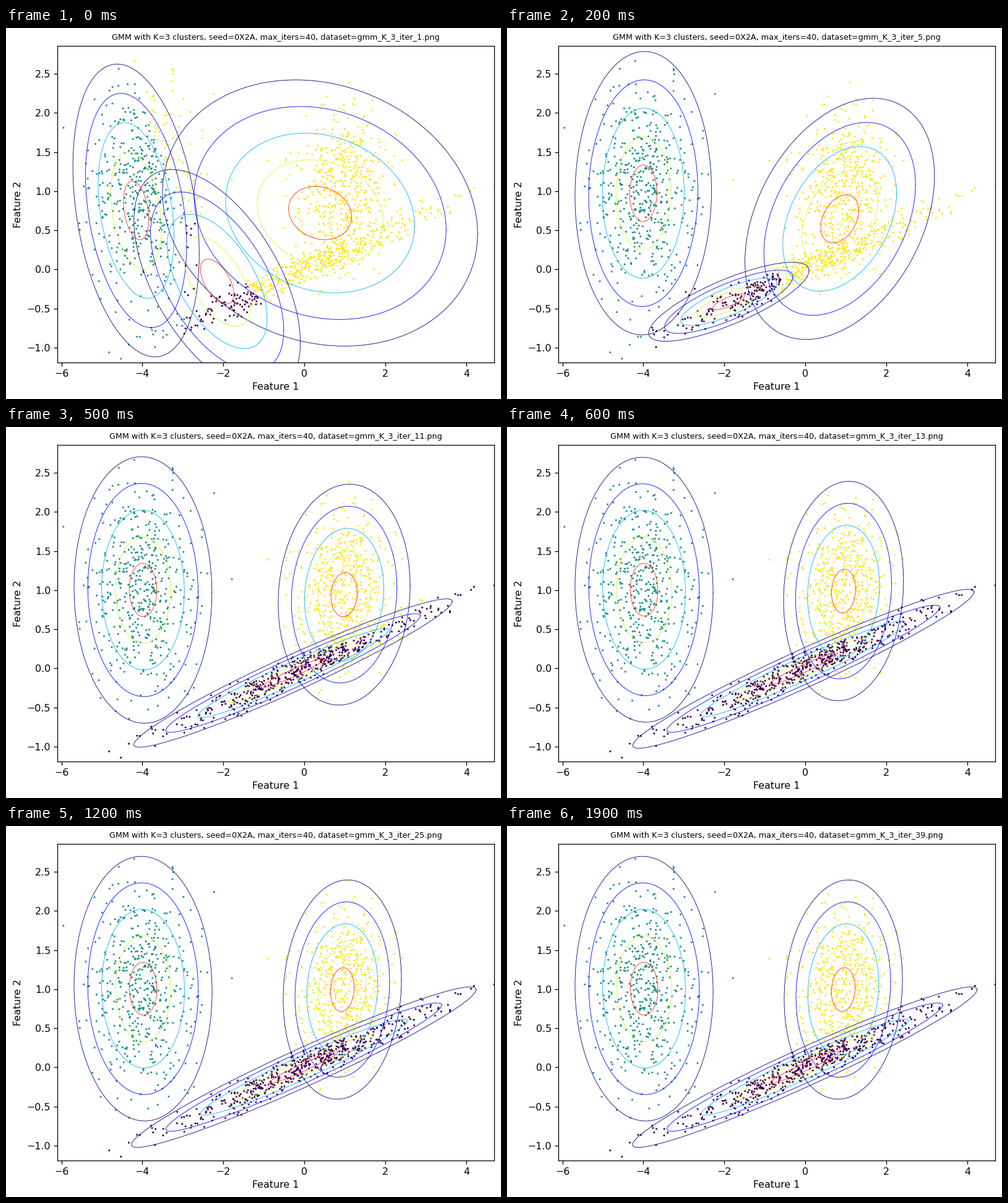
A matplotlib script for the animation above (2 s loop, 800 by 600 pixels).

```python
import numpy as np
import matplotlib.pyplot as plt
from matplotlib.animation import FuncAnimation

FRAMES, INTERVAL = 20, 100
W, H, DPI = 800, 600, 100
PT = 8 / 7  # scale of all point sizes
CLUSTER_COLORS = np.array(["#21918c", "#fde725", "#440154"])
RING_COLORS = ["#ff2a12", "#c8ff30", "#00b0ff", "#0000ff", "#000080"]

plt.rcParams.update({"font.family": "DejaVu Sans", "font.size": 10 * PT,
                     "axes.linewidth": 0.8 * PT, "axes.labelpad": 4 * PT,
                     "axes.titlepad": 6 * PT})

# Key poses of the teal, yellow and purple cluster: cx, cy, sx, sy, rho,
# where (sx, sy) is the ring step, half a standard deviation.
POSES = np.array([
    [[-4.156, 0.753, 0.312, 0.374, -0.30],
     [0.388, 0.721, 0.778, 0.340, -0.155],
     [-2.154, -0.154, 0.411, 0.286, -0.545]],
    [[-4.003, 0.974, 0.337, 0.362, 0.02],
     [0.848, 0.646, 0.468, 0.308, 0.355],
     [-1.890, -0.413, 0.396, 0.101, 0.79]],
    [[-3.991, 0.993, 0.339, 0.346, -0.01],
     [1.092, 0.819, 0.406, 0.287, 0.06],
     [-0.909, -0.208, 0.632, 0.153, 0.96]],
    [[-3.983, 1.006, 0.341, 0.338, -0.025],
     [0.937, 0.995, 0.292, 0.280, 0.09],
     [-0.014, 0.004, 0.851, 0.205, 0.966]],
])
POSE_ITERS = [1, 5, 9, 15]
EASES = [lambda t: 1 - (1 - t)**2,
         lambda t: t**1.5,
         lambda t: 1 - (1 - t)**3]
STRAYS = [(-4.82, -1.06), (-4.53, -1.14), (-5.95, 1.81), (-2.23, 2.24),
          (-1.79, 1.14), (-0.89, 1.39), (4.69, 1.06)]


def shape(unit, pose, scale):
    """Map unit-normal coordinates onto a cluster."""
    cx, cy, sx, sy, rho = pose
    u, v = unit
    return np.array([cx + scale * sx * u,
                     cy + scale * sy * (rho * u + np.sqrt(1 - rho**2) * v)])


def poses(it):
    """Ease between the key poses around an iteration."""
    pos = np.interp(it, POSE_ITERS, range(len(POSES)))
    i = min(int(pos), len(EASES) - 1)
    return POSES[i] + EASES[i](pos - i) * (POSES[i + 1] - POSES[i])


def log_density(pose, weight):
    cx, cy, sx, sy, rho = pose
    u, v = (X - cx) / (2 * sx), (Y - cy) / (2 * sy)
    q = 1 - rho**2
    dist = (u**2 + v**2 - 2 * rho * u * v) / q
    return np.log(weight / (sx * sy * np.sqrt(q))) - dist / 2


def labels(it):
    """Assign points with the parameters before the update."""
    if it == 1:
        right = (X + 0.69 * Y > -2.53) & (Y + 0.628 * X > -1.08)
        return np.where(right, 1, np.where(X < -2.97, 0, 2))
    purple = np.interp(it - 1, [1, 13], [0.05, 0.33])
    weights = [0.33, 0.67 - purple, purple]
    return np.argmax([log_density(*pw) for pw in zip(poses(it - 1), weights)],
                     axis=0)


def sample(rng, pose, count, limit=2.6):
    unit = rng.standard_normal((2, 2 * count))
    return shape(unit[:, np.hypot(*unit) < limit][:, :count], pose, 2).T


rng = np.random.default_rng(42)
X, Y = np.vstack([sample(rng, pose, 500) for pose in POSES[-1]] + [STRAYS]).T

fig = plt.figure(figsize=(W / DPI, H / DPI), dpi=DPI, facecolor="white")
ax = fig.add_axes([83.3 / W, 59 / H, 705.7 / W, 512 / H])
ax.set(xlim=(-6.095, 4.688), ylim=(-1.189, 2.855),
       xticks=range(-6, 5, 2), yticks=np.arange(-1, 2.6, 0.5),
       xlabel="Feature 1", ylabel="Feature 2")
ax.tick_params(length=3.5 * PT, width=0.8 * PT, pad=3.5 * PT)
title = ax.set_title("", fontsize=8 * PT)
dots = ax.scatter(X, Y, s=5, linewidths=0, zorder=1)
rings = [[ax.plot([], [], color=c, lw=0.6, zorder=2)[0] for c in RING_COLORS]
         for _ in CLUSTER_COLORS]
angle = np.linspace(0, 2 * np.pi, 241)
circle = np.array([np.cos(angle), np.sin(angle)])


def update(frame):
    it = 1 + 2 * frame
    title.set_text("GMM with K=3 clusters, seed=0X2A, max_iters=40, "
                   f"dataset=gmm_K_3_iter_{it}.png")
    dots.set_facecolor(CLUSTER_COLORS[labels(it)])
    for pose, lines in zip(poses(it), rings):
        for k, line in enumerate(lines, 1):
            line.set_data(*shape(circle, pose, k))
    return [title, dots]


anim = FuncAnimation(fig, update, frames=FRAMES, interval=INTERVAL,
                     init_func=lambda: update(0), repeat=True, repeat_delay=0)
plt.show()
```
